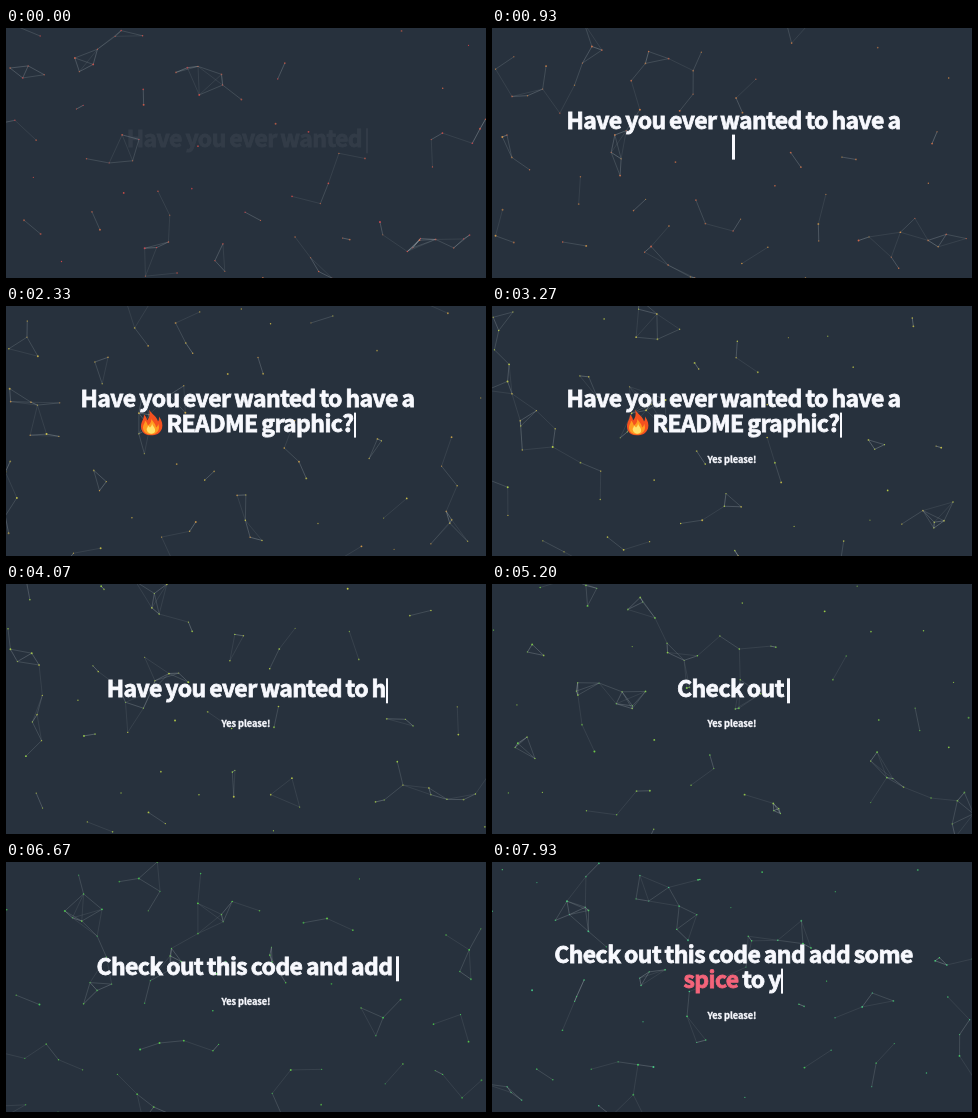
An HTML page for the animation above (8 s loop, 480 by 250 pixels).

```html
<!DOCTYPE html>
<html lang="en">
<head>
<meta charset="utf-8">
<title>Typing headline</title>
<style>
  html, body { position: relative; margin: 0; width: 100%; height: 100%; overflow: hidden; background: #27313d; }
  #net { position: absolute; left: 0; top: 0; display: block; width: 100%; height: 100%; }
  #net path { fill: none; stroke: #cbd6d8; stroke-width: .6; }
  #head {
    position: absolute; left: 0; top: 104px; width: 100%; box-sizing: border-box; padding-left: 3px;
    color: #f8f9fe; text-align: center; white-space: pre;
    font: 900 23px/25.4px "Noto Sans CJK JP", "Noto Sans CJK SC", "Noto Sans", sans-serif;
    letter-spacing: -.6px; word-spacing: -1px; -webkit-text-stroke: .8px;
  }
  .line { height: 25.4px; }
  .hot { color: #f4647a; }
  .cursor { display: inline-block; width: 2.6px; height: 25px; background: currentColor; vertical-align: top; margin-top: 3px; }
  .flame { display: inline-block; width: 25px; height: 26px; vertical-align: top; margin: 0 -1px 0 0; stroke: none; }
  #sub {
    position: absolute; left: 0; right: 0; top: 100%; margin-top: 14px;
    font-size: 9.2px; line-height: 18px; letter-spacing: -.05px; word-spacing: 0; -webkit-text-stroke: .35px;
  }
</style>
</head>
<body>
<svg id="net" viewBox="0 0 480 250"></svg>
<div id="head"><div id="title"></div><div id="sub">Yes please!</div></div>
<script>
const LOOP = 8000, STEP = 1000 / 15, COUNT = 90, REACH = 32, LEVELS = 5;
const W = 500, H = 270, PAD = 10;
const FIRST = [...'Have you ever wanted to have a \n🔥 README graphic?'];
const SECOND = [...'Check out this code and add some \nspice to your'];
const FLAME = `<svg class="flame" viewBox="0 0 25 26">
  <path fill="#f4511f" d="M10 0C13 5 18 7 19 12C20 11 20 9 20 7C23 11 24 15 23 19C21 24 17 26 12 26C6 26 2 22 2 17C2 12 5 10 5 5C7 7 8 9 8 11C11 8 11 4 10 0Z"/>
  <path fill="#ff9c20" d="M12 7C12 12 17 13 17 18C19 17 19 15 19 14C22 20 18 25 12 25C7 25 4 22 4 18C4 15 6 14 6 11C8 13 8 14 9 16C12 14 13 11 12 7Z"/>
  <path fill="#ffe36a" d="M13 13C13 17 17 18 16 22C15 25 9 25 8 21C7 19 9 18 9 16L11 18C13 16 13 15 13 13Z"/></svg>`;

const $ = id => document.getElementById(id);
const net = $('net'), head = $('head'), title = $('title'), sub = $('sub');
const clamp = x => Math.max(0, Math.min(1, x));
const wrap = (x, size) => ((x % size) + size) % size - PAD;

let seed = 41;
const rand = () => (seed = (seed * 16807) % 2147483647) / 2147483647;

function add(name, attrs) {
  const el = document.createElementNS('http://www.w3.org/2000/svg', name);
  for (const key in attrs) el.setAttribute(key, attrs[key]);
  return net.appendChild(el);
}

const links = Array.from({ length: LEVELS }, (_, i) => add('path', { opacity: .17 + .1 * i }));
const dots = Array.from({ length: COUNT }, () => ({
  x: rand() * W, y: rand() * H,
  vx: (rand() - .5) * .045, vy: (rand() - .5) * .045,
  tint: rand() * 24 - 12,
  el: add('circle', { r: .6 + rand() * .4, opacity: .5 + rand() * .4 })
}));

function drawNet(t) {
  const hue = 8 + t * .0165;
  const pts = dots.map(d => {
    const x = wrap(d.x + d.vx * t, W), y = wrap(d.y + d.vy * t, H);
    d.el.setAttribute('cx', x);
    d.el.setAttribute('cy', y);
    d.el.setAttribute('fill', `hsl(${hue + d.tint} 70% 58%)`);
    return [x, y];
  });
  const paths = Array(LEVELS).fill('');
  pts.forEach(([x, y], i) => {
    for (const [u, v] of pts.slice(i + 1)) {
      const near = 1 - Math.hypot(x - u, y - v) / REACH;
      if (near > 0) paths[Math.floor(near * LEVELS)] += `M${x} ${y}L${u} ${v}`;
    }
  });
  links.forEach((el, i) => el.setAttribute('d', paths[i]));
}

// Number of typed characters; a line break comes along with the space before it.
function typed(t) {
  if (t < 3800) return [FIRST, Math.min(48, 21 + Math.floor(t / 85))];
  if (t < 4360) return [FIRST, Math.max(0, 48 - Math.floor((t - 3800) / 11.5))];
  return [SECOND, Math.max(0, Math.floor((t - 4370) / 82))];
}

function drawText(t) {
  const [chars, n] = typed(t);
  const br = chars.indexOf('\n');
  const shown = chars.slice(0, n >= br ? n + 1 : n).join('');
  const html = shown.split(' \n').map(line => line
    .replace('🔥', FLAME)
    .replace(/^sp?i?c?e?/, '<span class="hot">$&</span>'));
  html[html.length - 1] += '<span class="cursor"></span>';
  title.innerHTML = html.map(line => `<div class="line">${line}</div>`).join('');

  const enter = clamp(t / 600);
  head.style.opacity = .05 + .95 * enter;
  head.style.transform = `translateY(calc(-50% + ${6 * (1 - enter) ** 2}px))`;
  sub.style.opacity = clamp((t - 2800) / 350);
}

function frame(now) {
  const t = Math.floor((now % LOOP + 4) / STEP) * STEP;
  drawNet(t);
  drawText(t);
  requestAnimationFrame(frame);
}
requestAnimationFrame(frame);
</script>
</body>
</html>
```
